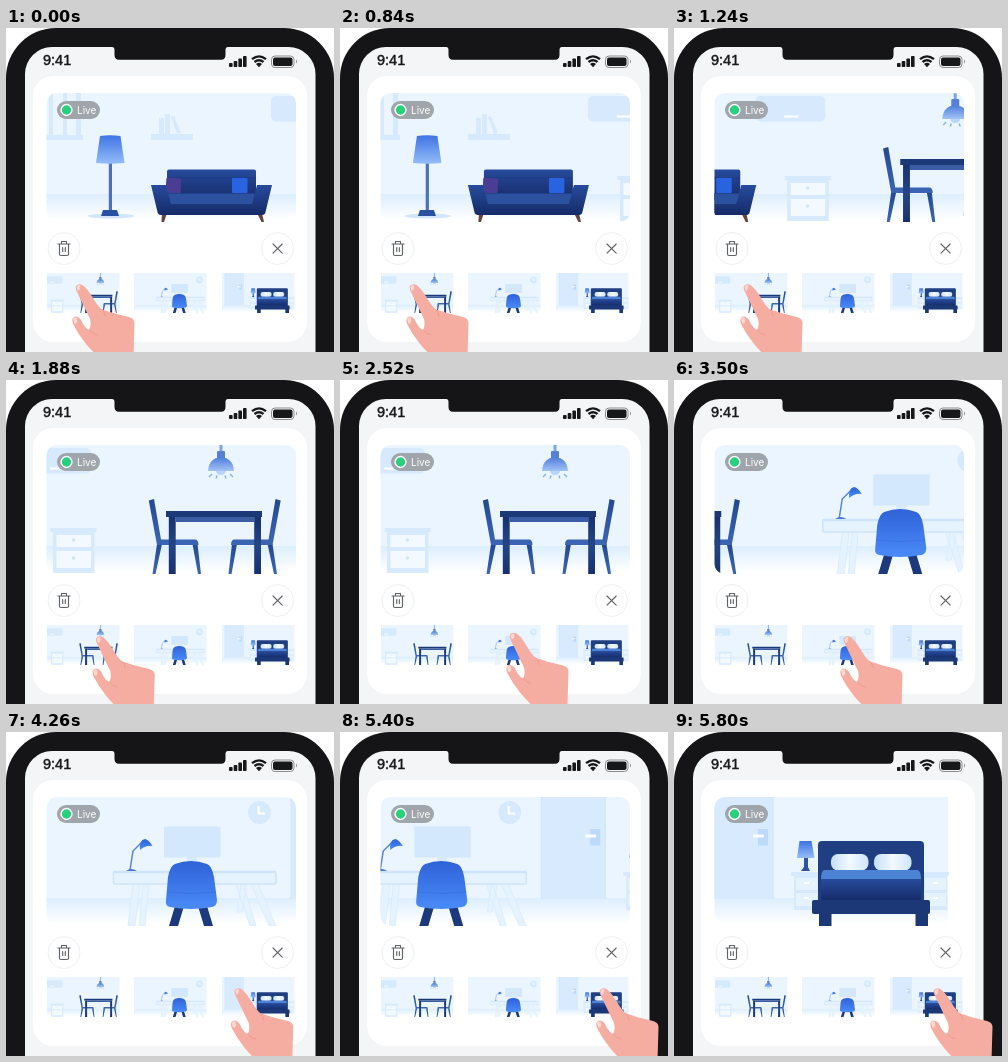
Recreate the animation shown at these times as an HTML page. Size 328 px wide and 324 px high, loop 6000 ms.

```html
<!DOCTYPE html>
<html lang="en">
<head>
<meta charset="utf-8">
<title>Room camera</title>
<style>
  html, body { margin: 0; width: 100%; height: 100%; overflow: hidden; background: #fff; }
  svg { display: block; }
  .clock { font: 14.5px "Liberation Sans", Arial, sans-serif; fill: #17181a; stroke: #17181a; stroke-width: .45; }
  .live { font: 10px Inter, sans-serif; fill: #fff; }
  .pale { fill: #d7eafd; }
  .soft { fill: #e5f2ff; }
  .line { fill: none; stroke: #606367; stroke-width: 1.15; stroke-linecap: round; stroke-linejoin: round; }
</style>
</head>
<body>
<svg width="328" height="324" viewBox="0 0 328 324">
  <defs>
    <linearGradient id="floor" x2="0" y2="1"><stop stop-color="#dceefe"/><stop offset=".9" stop-color="#fff"/></linearGradient>
    <linearGradient id="shade" x2="0" y2="1"><stop stop-color="#3f74e4"/><stop offset="1" stop-color="#94bdf8"/></linearGradient>
    <linearGradient id="dome" x2="0" y2="1"><stop stop-color="#5080dc"/><stop offset="1" stop-color="#a3c2f4"/></linearGradient>
    <linearGradient id="navy" x2="0" y2="1"><stop stop-color="#274b9c"/><stop offset="1" stop-color="#152b68"/></linearGradient>
    <linearGradient id="leg" x2="0" y2="1"><stop stop-color="#18326f"/><stop offset=".5" stop-color="#234585"/><stop offset="1" stop-color="#17316f"/></linearGradient>
    <linearGradient id="wood" x2="0" y2="1"><stop stop-color="#234890"/><stop offset="1" stop-color="#3c66b5"/></linearGradient>
    <linearGradient id="seat" x2="0" y2="1"><stop stop-color="#2f62d8"/><stop offset="1" stop-color="#4a8bf8"/></linearGradient>
    <linearGradient id="pillow"><stop stop-color="#c5dffb"/><stop offset=".5" stop-color="#f3f9ff"/><stop offset="1" stop-color="#cfe5fc"/></linearGradient>
    <clipPath id="view"><rect x="40.5" y="65" width="249.5" height="129" rx="10"/></clipPath>

    <g id="chair" fill="url(#wood)">
      <path d="M401 164H406L399.500 194H396.500ZM436.500 164H441.500L445 194H442Z"/>
      <path d="M392.800 120.500L398 119L405 159.500H439Q442.500 159.500 442.500 165H401Z"/>
    </g>
    <g id="stand">
      <path class="pale" d="M867 140H896V144H894V178H870V144H867Z"/>
      <path class="soft" d="M872 146H893V158H872ZM872 161H893V174H872Z"/>
      <path d="M880 151H885M880 166H885" stroke="#fff" stroke-width="2"/>
    </g>

    <g id="room">
      <rect y="50" width="1024" height="117" fill="#eaf5ff"/>
      <rect y="166" width="1024" height="28.500" fill="url(#floor)"/>

      <!-- living room -->
      <path class="pale" d="M40 64H75V107H77V112H40V107H43V64ZM47 64V107H57V64ZM61 64V107H70V64Z" fill-rule="evenodd"/>
      <path class="pale" d="M145 106H187V112H145ZM153 90H158V106H153ZM159 86H164V106H159ZM165 89L168 88L175 105L171 106Z"/>
      <ellipse cx="105" cy="188" rx="23" ry="2.500" fill="#d2e5fa"/>
      <path d="M102.800 134H106V183H102.800Z" fill="#4c70bd"/>
      <path d="M97 182H111L113 188H95Z" fill="#28519f"/>
      <path d="M94 108Q104 106.500 114.500 108L118.500 135Q104 136.500 90 135Z" fill="url(#shade)"/>
      <path d="M156 185H161L158 194H155.500ZM251 185H256L258 194H255.500Z" fill="#65453f"/>
      <rect x="161" y="141.500" width="89" height="30" rx="2" fill="url(#navy)"/>
      <path d="M162 150H249" stroke="#1c3a83"/>
      <rect x="160" y="150" width="15" height="15" rx="1" fill="#4c3d94" transform="rotate(3 167 157)"/>
      <rect x="226" y="150" width="15.500" height="15" rx="1" fill="#2a63e0"/>
      <path d="M155 165H256V187H155Z" fill="#1b3478"/>
      <path d="M157 165.500H254V176H157Z" fill="#2c519f"/>
      <path d="M145 157H160L165 176H246L251 157H266L259.500 184Q259 187 256 187H155Q152 187 151.500 184Z" fill="url(#navy)"/>

      <!-- dining room -->
      <rect class="pale" x="265" y="68" width="70" height="25.500" rx="5"/>
      <path d="M294 88.500H308" stroke="#fff" stroke-width="2"/>
      <path class="pale" d="M294.500 148H340.500V152H338.500V193H297V152H294.500Z"/>
      <path d="M300.500 155H335V167H300.500ZM300.500 171H335V188H300.500Z" fill="#f2f9ff"/>
      <g fill="#cfe5fb"><circle cx="317.500" cy="160" r="1.700"/><circle cx="317.500" cy="178" r="1.700"/></g>
      <path d="M465 50V73" stroke="#7fa4e6" stroke-width="3"/>
      <rect x="461" y="71" width="8" height="8" rx="1" fill="#5580d5"/>
      <path d="M452 91Q453 77.500 465 77.500Q477 77.500 478 91Z" fill="url(#dome)"/>
      <path d="M460 91H470Q469 95 465 95Q461 95 460 91Z" fill="#b8d5fb"/>
      <path d="M456 94L453 97M461 95.500L460 98.500M469 95.500L470 98.500M474 94L477 97" stroke="#86aff0" stroke-width="1.400"/>
      <use href="#chair"/>
      <use href="#chair" transform="matrix(-1 0 0 1 917.500 0)"/>
      <path d="M412.800 137H419.700V194H412.800ZM498.200 137H505V194H498.200Z" fill="url(#leg)"/>
      <path d="M410 131H506V137H410Z" fill="#1b3977"/>
      <path d="M419.700 137H498.200V142H419.700Z" fill="#3a5da4"/>

      <!-- study -->
      <rect x="658" y="94.500" width="56.500" height="31" rx="1" fill="#d3e7fd"/>
      <path class="pale" d="M681 125H691V139H681Z"/>
      <circle cx="753.500" cy="80.500" r="11.500" class="pale"/>
      <path d="M752.500 74V81.500H759" fill="none" stroke="#fff" stroke-width="2"/>
      <path class="soft" d="M627 152H634L629 194H622ZM637 152H643L639 194H633ZM730 152H737L750 194H744ZM745 152H752L770 194H763ZM735 152H741L736 180H731Z" stroke="#d9ebfd" stroke-width=".8"/>
      <rect x="607.500" y="140" width="162.500" height="12" rx="1.500" class="soft" stroke="#cfe4fb" stroke-width="1.600"/>
      <path d="M607 140H770" stroke="#cfe4fb" stroke-width="2.500"/>
      <path d="M624 138L627 119L637 109" fill="none" stroke="#5784d5" stroke-width="1.500"/>
      <path d="M620 139Q625 135 631 139Z" fill="#4b78cc"/>
      <path d="M634 118Q633 108 639 107Q643 108 646.500 114Q640 113 634 118Z" fill="url(#seat)"/>
      <path d="M669 174H678L672 194H663ZM692 174H701L707 194H698Z" fill="#1c397c"/>
      <path d="M669 132Q685 126 701 132Q706 134 708 145L711 168Q711 174 706 175Q685 179 664 175Q659 174 660 168L662 145Q664 134 669 132Z" fill="url(#seat)"/>
      <path d="M661 160Q685 163 710 160" fill="none" stroke="#3872e6" stroke-width=".8"/>

      <!-- bedroom -->
      <rect x="785" y="50" width="64.500" height="117" fill="#d8ebfe"/>
      <path d="M785 50V167M849 50V167" stroke="#cee5fc"/>
      <rect x="834" y="97" width="10" height="16.500" fill="#bddafb"/>
      <rect x="829" y="102.500" width="11" height="3" rx="1.500" fill="#fff"/>
      <use href="#stand"/>
      <use href="#stand" x="129"/>
      <path d="M880 125H884V135L886 139H877L880 135Z" fill="#2b54a8"/>
      <path d="M875.500 109H887.500L890.500 126H873Z" fill="url(#shade)"/>
      <path d="M895 180H907.500V194H895ZM991.500 180H1004V194H991.500Z" fill="#1b3876"/>
      <rect x="894" y="109" width="106" height="62" rx="4" fill="#203f83"/>
      <rect x="907" y="122" width="37.500" height="16.500" rx="7" fill="url(#pillow)"/>
      <rect x="950" y="122" width="37.500" height="16.500" rx="7" fill="url(#pillow)"/>
      <path d="M900 138H994Q997 140 997 147H897Q897 140 900 138Z" fill="#4d83d4"/>
      <rect x="897" y="147" width="100" height="22" fill="url(#navy)"/>
      <rect x="888" y="168" width="118" height="14" rx="2" fill="#1d3877"/>
    </g>
  </defs>

  <!-- phone -->
  <rect width="328" height="400" rx="50" fill="#151416"/>
  <rect x="19" y="19" width="290.500" height="380" rx="27" fill="#f4f5f7"/>
  <path d="M106 18H222V19Q219.500 19 219.500 22V27Q219.500 31.800 215 31.800H113Q108.500 31.800 108.500 27V22Q108.500 19 106 19Z" fill="#151416"/>
  <text class="clock" x="37" y="37">9:41</text>
  <g fill="#17181a">
    <rect x="223" y="35" width="3.600" height="4" rx=".8"/><rect x="227.700" y="33" width="3.600" height="6" rx=".8"/>
    <rect x="232.400" y="30.500" width="3.600" height="8.500" rx=".8"/><rect x="237" y="28" width="3.600" height="11" rx=".8"/>
    <path d="M250 36Q253 33.500 256 36L253 39.300Z"/>
    <rect x="267" y="29.500" width="19.500" height="8.500" rx="2"/>
    <path d="M290 31.500Q292 33.500 290 35.500Z" opacity=".5"/>
  </g>
  <path d="M246 31.200Q253 25.500 260 31.200M248.500 34Q253 30.500 257.500 34" fill="none" stroke="#17181a" stroke-width="2.300"/>
  <rect x="265.500" y="28" width="22.500" height="11.500" rx="3.500" fill="none" stroke="#8b8c8f"/>
  <rect x="27" y="48" width="274" height="266" rx="20" fill="#fff"/>

  <g clip-path="url(#view)"><use href="#room" id="pan"/></g>

  <rect x="51" y="73" width="43" height="18" rx="9" fill="#9fa5ab"/>
  <circle cx="60.500" cy="82" r="5.400" fill="#27d07c" stroke="#fff" stroke-width="1.500"/>
  <text class="live" x="71" y="86">Live</text>

  <g fill="#fff" stroke="#eeeff0"><circle cx="58" cy="220.500" r="16"/><circle cx="271.500" cy="220.500" r="16"/></g>
  <path class="line" d="M52 216H64M55.500 216V213.500H60.500V216M53.500 216V226Q53.500 227.500 55 227.500H61Q62.500 227.500 62.500 226V216M56.700 219.500V223.500M59.300 219.500V223.500"/>
  <path class="line" d="M267 216L276.200 225.200M276.200 216L267 225.200"/>

  <g id="thumbs"></g>

  <g id="hand">
    <path d="M70 258Q72.500 255 76.500 257Q81 260 87 270Q92 278.500 96 281.500Q101 282.500 107 285L123 289Q128.500 290.500 128.500 295L127 345H104L98 335Q86 323 80 316Q72 306 67 296Q65 289.500 69 288.500Q74 288.500 76 294Q78 299 83 302Q85.500 298 84 291L71 264Q69 260.500 70 258Z" fill="#f6ada1"/>
    <path d="M96 281.500Q98.500 284 99 288M83 302Q86 306 91 307" fill="none" stroke="#e99c90" stroke-linecap="round"/>
    <path d="M70.500 259Q71.500 256.800 74 257Q75 259 73.500 262L71.500 263Z" fill="#fbd8d1"/>
    <path d="M67 290Q69 288.500 71 290Q72 293 70 296L68 295Z" fill="#fbd8d1"/>
  </g>
</svg>
<script>
  const LOOP = 6000, STEP = 250, LIFT = 9;
  const starts = [0, 2200, 4400];
  const handX = [0, 100, 190];
  const thumbs = [[41, 282.8], [128, 530.4], [216, 775.3]];
  const MID = [36.25, 265.2];
  const $ = id => document.getElementById(id);
  const move = (el, x, y) => el.setAttribute("transform", `translate(${x} ${y})`);

  // Linear value at time t from steps of [ms, value]
  function at(t, steps) {
    const i = steps.findIndex(step => step[0] > t);
    if (i === 0) return steps[0][1];
    if (i < 0) return steps[steps.length - 1][1];
    const [t0, a] = steps[i - 1], [t1, b] = steps[i];
    return a + (b - a) * (t - t0) / (t1 - t0);
  }

  const pan = [], slide = [], tap = [], press = [];
  starts.forEach((t, i) => {
    pan.push([t + 800, -STEP * i], [t + 1400, -STEP * (i + 1)]);
    slide.push([t, handX[i]], [t + 1800, handX[i]]);
    tap.push([t, 0], [t + 200, -LIFT], [t + 400, 0]);
    press.push([[t + 400, 1], [t + 600, .95], [t + 800, 1]]);
  });

  $("thumbs").innerHTML = thumbs.map(([x, left]) =>
    `<g><svg x="${x}" y="245" width="72.5" height="40.4" viewBox="${left} 57 247.4 138" preserveAspectRatio="none">
      <use href="#room"/></svg></g>`).join("");
  const cards = [...$("thumbs").children];

  function draw() {
    const t = performance.now() % LOOP;
    move($("pan"), at(t, pan), 0);
    move($("hand"), at(t, slide), at(t, tap));
    cards.forEach((card, i) => {
      const s = at(t, press[i]), cx = thumbs[i][0] + MID[0];
      card.setAttribute("transform", `translate(${cx * (1 - s)} ${MID[1] * (1 - s)}) scale(${s})`);
    });
    requestAnimationFrame(draw);
  }
  draw();
</script>
</body>
</html>
```
